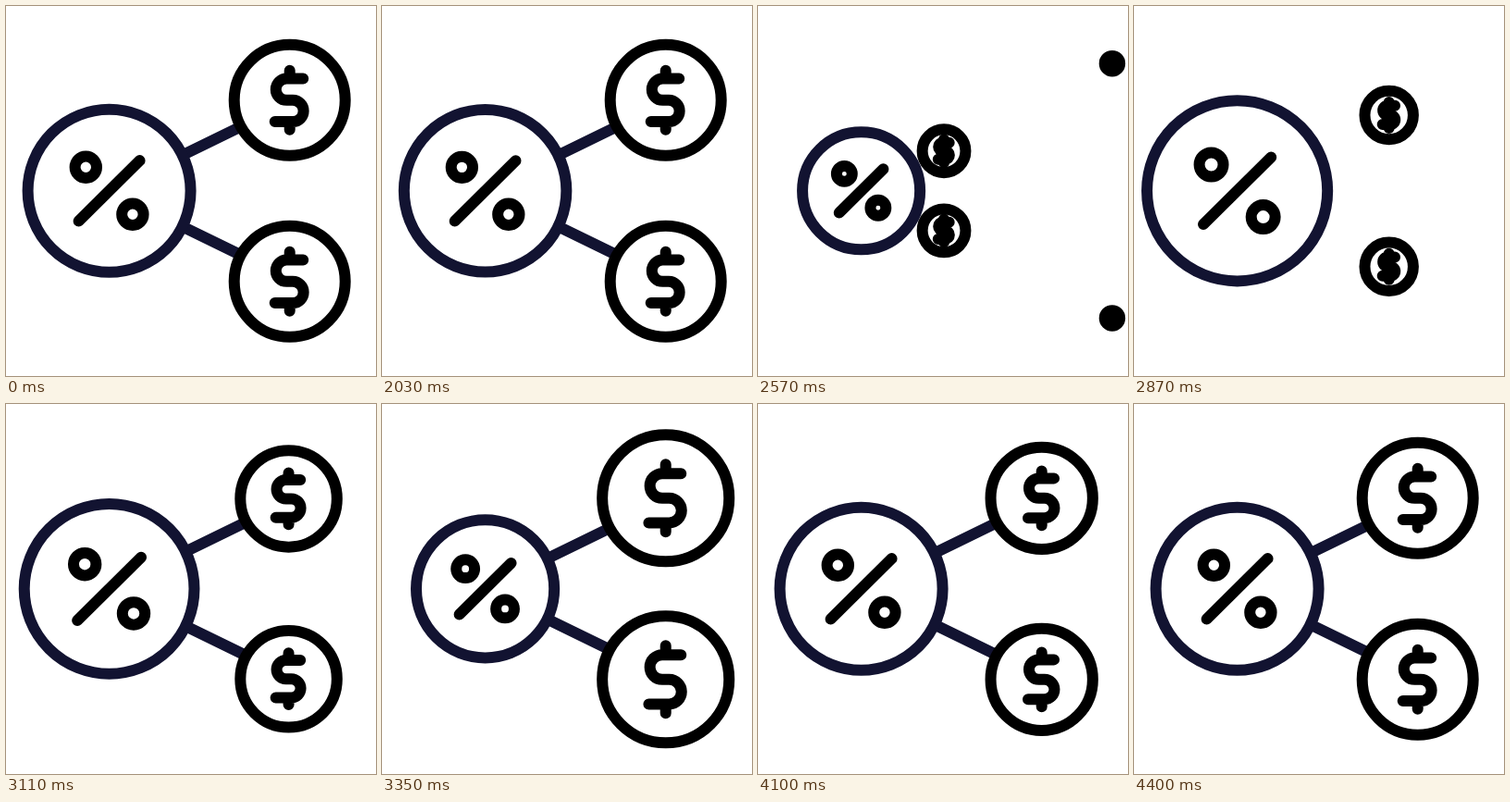
Animation of 400 by 400 pixels, one loop 4430 ms. Source, as an HTML page with a canvas:

```html
<!DOCTYPE html>
<html lang="en">
<head>
<meta charset="utf-8">
<style>
  html, body { margin: 0; width: 100%; height: 100%; overflow: hidden; background: #fff; }
  canvas { display: block; width: 400px; height: 400px; }
</style>
</head>
<body>
<canvas id="stage" width="400" height="400"></canvas>
<script>
const ctx = document.getElementById('stage').getContext('2d');
const LOOP = 4430, STEP = 30;
const NAVY = '#121331', BLACK = '#000';
const HUB = { x: 111.6, y: 199.8 };
const COIN = { x: 306.7, rise: 98 };

// Keys are [time, value] pairs, joined by sine easing.
const hubScale = [[2000, 1], [2500, .695], [2940, 1.136], [3390, .842], [4040, 1]];
const newCoinScale = [[2780, .39], [3340, 1.143], [3780, .83], [4400, 1]];
const oldCoinScale = [[2030, 1], [2742, 0]];
const newCoinX = [[2035, HUB.x], [3165, COIN.x]];
const oldCoinX = [[2035, COIN.x], [3165, 473]];
const lineReach = [[2030, 1], [2450, .2], [2870, .4], [3280, 1]];

function valueAt(keys, t) {
  if (t <= keys[0][0]) return keys[0][1];
  for (let i = 1; i < keys.length; i++) {
    const [t0, a] = keys[i - 1], [t1, b] = keys[i];
    if (t < t1) return a + (b - a) * (1 - Math.cos(Math.PI * (t - t0) / (t1 - t0))) / 2;
  }
  return keys[keys.length - 1][1];
}

function circle(x, y, r) {
  ctx.moveTo(x + r, y);
  ctx.arc(x, y, r, 0, 2 * Math.PI);
}

// Scales the geometry only; the stroke keeps its width.
function shape(x, y, scale, color, trace, fill) {
  ctx.save();
  ctx.translate(x, y);
  ctx.scale(scale, scale);
  ctx.beginPath();
  trace();
  ctx.restore();
  if (fill) {
    ctx.fillStyle = '#fff';
    ctx.fill();
  }
  ctx.strokeStyle = color;
  ctx.stroke();
}

function dollar() {
  const r = 11.65, turn = Math.PI / 2;
  ctx.moveTo(14.5, -2 * r);
  ctx.lineTo(-3.3, -2 * r);
  ctx.arc(-3.3, -r, r, -turn, turn, true);
  ctx.lineTo(3.3, 0);
  ctx.arc(3.3, r, r, -turn, turn);
  ctx.lineTo(-16, 2 * r);
  for (const side of [-1, 1]) {
    ctx.moveTo(0, side * 32);
    ctx.lineTo(0, side * 2 * r);
  }
}

function percent() {
  ctx.moveTo(-33, 32.7);
  ctx.lineTo(33, -32.7);
  circle(-25.3, -25.5, 11.7);
  circle(25.3, 25.5, 11.7);
}

function coins(x, scale) {
  if (scale <= 0.01) return;
  const rise = COIN.rise + (x - COIN.x) * .52;
  for (const side of [-1, 1]) {
    const y = HUB.y + side * rise;
    shape(x, y, scale, BLACK, () => circle(0, 0, 60), true);
    shape(x, y, scale, BLACK, dollar);
  }
}

function draw(t) {
  ctx.fillStyle = '#fff';
  ctx.fillRect(0, 0, 400, 400);
  ctx.lineWidth = 12;
  ctx.lineCap = ctx.lineJoin = 'round';

  const reach = (COIN.x - HUB.x) * valueAt(lineReach, t);
  shape(HUB.x, HUB.y, 1, NAVY, () => {
    for (const side of [-1, 1]) {
      ctx.moveTo(0, 0);
      ctx.lineTo(reach, side * .488 * reach);
    }
  });

  coins(valueAt(oldCoinX, t), valueAt(oldCoinScale, t));
  if (t >= 2030) coins(valueAt(newCoinX, t), valueAt(newCoinScale, t));

  const scale = valueAt(hubScale, t);
  shape(HUB.x, HUB.y, scale, NAVY, () => circle(0, 0, 88), true);
  shape(HUB.x, HUB.y, scale, BLACK, percent);
}

const start = performance.now();
function tick() {
  const t = (performance.now() - start) % LOOP;
  draw(t < 2030 ? 0 : 2030 + Math.floor((t - 2030) / STEP) * STEP);
  requestAnimationFrame(tick);
}
tick();
</script>
</body>
</html>
```
